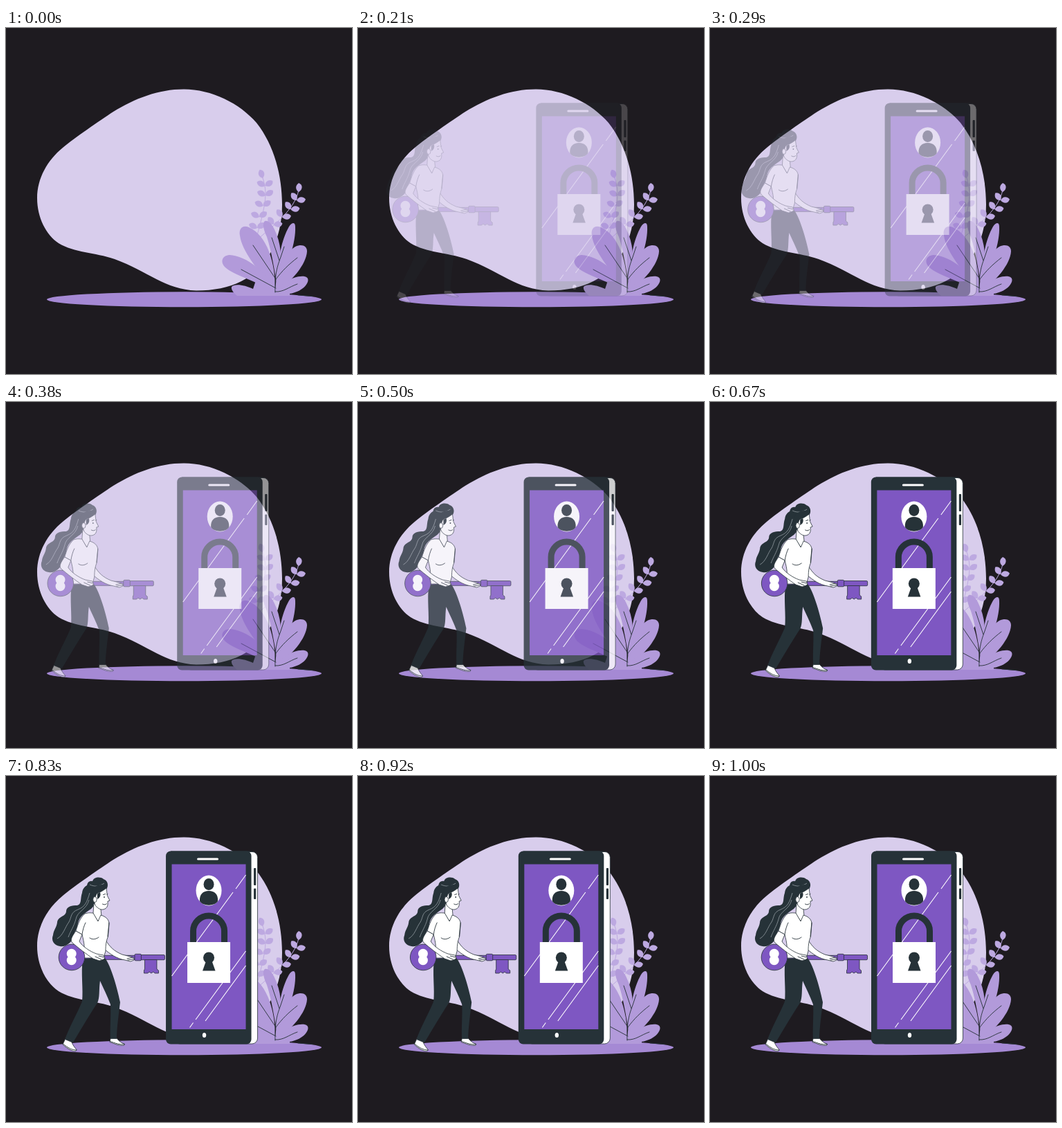
Write an HTML page that moves like this. It is 500 px wide and 500 px high and loops after 1040 ms.

```html
<!DOCTYPE html>
<html lang="en">
<head>
<meta charset="utf-8">
<title>Phone unlock</title>
<style>
  html, body { margin: 0; width: 100%; height: 100%; overflow: hidden; background: #1e1b20; }
  svg { display: block; width: 100vw; height: 100vh; }
  .dark { fill: #263238; }
  .white { fill: #fff; }
  .purple { fill: #7e57c2; }
  .outlined { stroke: #263238; stroke-width: .8; stroke-linejoin: round; }
  .line { fill: none; stroke: #263238; stroke-width: .9; stroke-linecap: round; }
  .shine { fill: none; stroke: #fff; stroke-width: 1.1; }
</style>
</head>
<body>
<svg viewBox="0 0 500 500">
  <rect width="500" height="500" fill="#1e1b20"/>
  <path fill="#d8cdec" d="M257 88.500C297 88.500 338 109 362 137C388 170 399 214 399 255C399 305 378 347 340 366C322 375 300 379.500 275 379.500C230 378 206 352 157 334C128 324 99 325 76 311C58 299 45 274 45 246C45 217 60 191 82 173C99 159 135 134 155 121C186 102 220 88.500 257 88.500Z"/>
  <ellipse cx="257.5" cy="392.3" rx="198.5" ry="11" fill="#a589d4"/>

  <g id="sprigs" fill="#bda9e1" stroke="#bda9e1">
    <path fill="none" d="M360 310C366 288 375 258 375 240C375 230 373 222 370 214M362 307C385 286 417 264 423 234"/>
  </g>
  <g fill="#b29ada">
    <path d="M389 380C390 340 377 299 351 288C342 284 336 290 338 300C341 322 362 348 389 380Z"/>
    <path d="M391 368C399 341 399 319 391 298C386 285 380 277 374 279C370 282 372 291 377 302C382 317 386 338 391 368Z"/>
    <path d="M391 365C408 345 419 310 418 287C418 280 413 281 409 287C398 306 393 335 391 365Z"/>
    <path d="M389 382C413 367 434 341 435 323C435 314 427 312 418 316C400 327 390 350 389 382Z"/>
    <path d="M389 385C411 387 431 380 436 367C439 358 428 357 416 361C402 366 394 374 389 385Z"/>
    <path d="M390 383C380 354 347 329 323 328C312 329 309 338 317 346C331 358 352 361 390 383Z"/>
    <path d="M326 374C330 369 345 371 357 377L361 365L390 375L410 384V387H334C329 383 325 378 326 374Z"/>
  </g>
  <path class="line" d="M389 382C388 355 393 342 396 334L402 316M390 363L357 314M390 376L340 349M395 336L384 303M390 363C399 351 408 342 421 332M389 381C401 382 409 374 421 370"/>
  <path class="line" stroke-width=".6" d="M422 386L443 387.5"/>

  <g id="woman">
    <path class="dark" d="M115 158C116 153 119 151 123 152C125 146 134 145 139 149C145 151 147 158 143 164C140 168 136 167 134 170C132 180 126 187 121 192C112 198 104 203 102 213C101 222 97 224 96 231C94 240 84 248 76 246C67 245 63 237 66 230C67 222 71 219 72 212C73 202 84 204 85 196C85 188 94 187 101 187C108 185 105 177 108 169C109 162 112 160 115 158Z"/>
    <path d="M119 169C115 183 112 189 102 193C91 197 93 204 89 211C83 219 81 230 72 235M118 179C115 193 101 195 99 207C96 218 91 224 88 233M119 157C126 160 132 160 140 155" fill="none" stroke="#a3abb0" stroke-width=".7"/>
    <rect class="purple outlined" x="108" y="259.300" width="78" height="6"/>
    <rect class="purple outlined" x="190" y="258.500" width="37.500" height="7.200" rx="1.500"/>
    <path class="purple outlined" d="M198.500 265.500V279L197.500 281V285H203L205 283L208 285L211 283L213 285H218.500V281L216 279V265.500Z"/>
    <rect class="purple outlined" x="184" y="257.300" width="9.500" height="9.500" rx="1.500"/>
    <path class="white outlined" d="M142 237C148 247 154 253 166 258L178 261L183 263V266L178 268L170 266C158 264 148 257 140 250Z"/>
    <path class="line" d="M173 264L181 262M174 266L182 264.500"/>
    <path class="dark" d="M109 264L140 262C148 270 158 302 163 327C161 345 158 364 158 381H149C148 365 150 345 149 330C144 317 139 307 134 296C132 310 134 320 130 328C117 348 107 365 95 385L83 381C90 362 100 345 108 326C110 308 106 285 109 264Z"/>
    <path class="white outlined" d="M83.500 380.500L80 388C88 395 95 398.500 99 397.500L100 395.500C97 392 94 388 93 384.500Z"/>
    <path class="white outlined" d="M149 379.500L148 384.500C155 387 163 390.500 169 389V387C165 386 161 383 158.500 379.500Z"/>
    <path class="line" d="M80.500 387C88 393 93 396 100 396M148.500 383.500C156 386 163 389 169.500 387.500"/>
    <path class="white outlined" d="M125 184L124 199L131 210L136 202L135 192Z"/>
    <path class="white outlined" d="M129 170C133 168 137 167 143 162C144 168 144 172 145 174L148 180L145 181C145.500 186 145 190 141 192C137 194 133 193 129 189C125 186 125 180 129 170Z"/>
    <path class="dark" d="M125 176C128 167 137 168 144 159C137 155 126 157 122 166L121 178Z"/>
    <path class="dark" d="M130 170L134 168C136 174 132 177 130 178Z"/>
    <ellipse class="white outlined" cx="126.500" cy="178.500" rx="2.700" ry="4"/>
    <path class="line" d="M137.500 185C140 186.500 142 186 143.500 184.500M138.500 171.500L141.500 170.500M144 171L145 170.500"/>
    <circle class="dark" cx="140" cy="175" r=".9"/>
    <path class="white outlined" d="M112 199C118 197 121 198 124 198L131 210L135 201C142 203 147 207 147 214L145.500 232C142 240 142 249 142 253L139 263H109C113 250 111 241 108 229L99 224C102 214 105 205 112 199Z"/>
    <path class="line" d="M108 229C109 222 111 216 113 212M119 234C123 237 128 236 132 233M145 232L147 212"/>
    <circle class="purple outlined" cx="93" cy="262" r="18.800"/>
    <path class="white" d="M87.500 261.500A7 7 0 1 1 98 261.500A7 7 0 1 1 87.500 261.500Z"/>
    <path class="white outlined" d="M99 224C94 231 90 237 94 241C102 248 115 258 124 264L133 267L139 265L141 263L139 259L129 257C120 254 108 246 104 239L108 229Z"/>
    <path class="line" d="M127 261L136 265M132 260L140 262"/>
  </g>

  <g id="phone">
    <rect class="white outlined" x="245" y="109.500" width="120.500" height="277.500" rx="8"/>
    <path class="dark" d="M240 108.500H356L361 110H240Z"/>
    <rect class="dark" x="233" y="108.500" width="123.500" height="279" rx="7"/>
    <rect class="dark" x="360" y="133" width="3.200" height="25" rx="1"/>
    <rect class="dark" x="360" y="162.500" width="3.200" height="15.500" rx="1"/>
    <rect class="purple" x="241.500" y="127.500" width="107" height="238.500"/>
    <rect class="white" x="278" y="118.500" width="31" height="3" rx="1.500"/>
    <ellipse class="white" cx="288.500" cy="374.500" rx="2.700" ry="3.500"/>
    <path class="shine" d="M348.500 143L334 163M330 168L241.500 289M348.500 253L276 352M272.500 356.500L267.500 363.500M348.500 274L290 354"/>
    <ellipse class="white" cx="295" cy="165.500" rx="18.500" ry="22"/>
    <ellipse class="dark" cx="295" cy="156.500" rx="7.500" ry="8.500"/>
    <path class="dark" d="M282 181C281 171 287 166 295 166S309 171 308 181C303 188.500 287 188.500 282 181Z"/>
    <path d="M272.500 241V224a22.500 22 0 0 1 45 0V241" fill="none" stroke="#263238" stroke-width="9"/>
    <rect class="white" x="264" y="240" width="62" height="59"/>
    <circle class="dark" cx="295" cy="262.500" r="8"/>
    <path class="dark" d="M291.500 266L286 281.500H304.500L299 266Z"/>
  </g>
</svg>
<script>
  const LOOP = 1040, FPS = 24, LEAD = 0.02, SLIDE = 30;
  const woman = document.getElementById('woman');
  const phone = document.getElementById('phone');

  // Each leaf: stem x, stem y, angle from vertical.
  function addLeaf(x, y, angle) {
    const leaf = document.createElementNS('http://www.w3.org/2000/svg', 'path');
    leaf.setAttribute('d', 'M0 0C-5.5 -3 -6 -9 -1 -13C5.5 -11 5.5 -4 0 0Z');
    leaf.setAttribute('stroke', 'none');
    leaf.setAttribute('transform', `translate(${x} ${y}) rotate(${angle})`);
    document.getElementById('sprigs').append(leaf);
  }
  addLeaf(371, 217, -15);
  [[374.5, 228], [375, 242], [371.5, 257], [366, 273], [363, 289]].forEach(([x, y]) => {
    addLeaf(x, y, -62);
    addLeaf(x, y, 60);
  });
  addLeaf(423, 237, 5);
  [[420, 249], [411.5, 262], [399, 273], [386.5, 284]].forEach(([x, y]) => {
    addLeaf(x, y, -32);
    addLeaf(x, y, 88);
  });

  const cubic = (s, a, b) => 3 * (1 - s) ** 2 * s * a + 3 * (1 - s) * s * s * b + s ** 3;

  function ease(x) {
    if (x >= 1) return 1;
    let low = 0, high = 1;
    for (let i = 0; i < 24; i++) {
      const mid = (low + high) / 2;
      if (cubic(mid, 0.36, 0.5) < x) low = mid; else high = mid;
    }
    return cubic(low, -0.01, 1.38);
  }

  function place(group, dx, opacity) {
    group.setAttribute('transform', `translate(${dx.toFixed(2)} 0)`);
    group.setAttribute('opacity', opacity.toFixed(3));
  }

  function render(ms) {
    const frame = Math.floor((ms % LOOP + 5) * FPS / 1000);
    const progress = frame < 3 ? 0 : ease(frame / FPS + LEAD);
    const offset = SLIDE * (1 - progress);
    const opacity = Math.min(1, Math.max(0, progress));
    place(woman, -offset, opacity);
    place(phone, offset, opacity);
  }

  let start;
  function tick() {
    const now = performance.now();
    start ??= now;
    render(now - start);
    requestAnimationFrame(tick);
  }
  tick();
</script>
</body>
</html>
```
